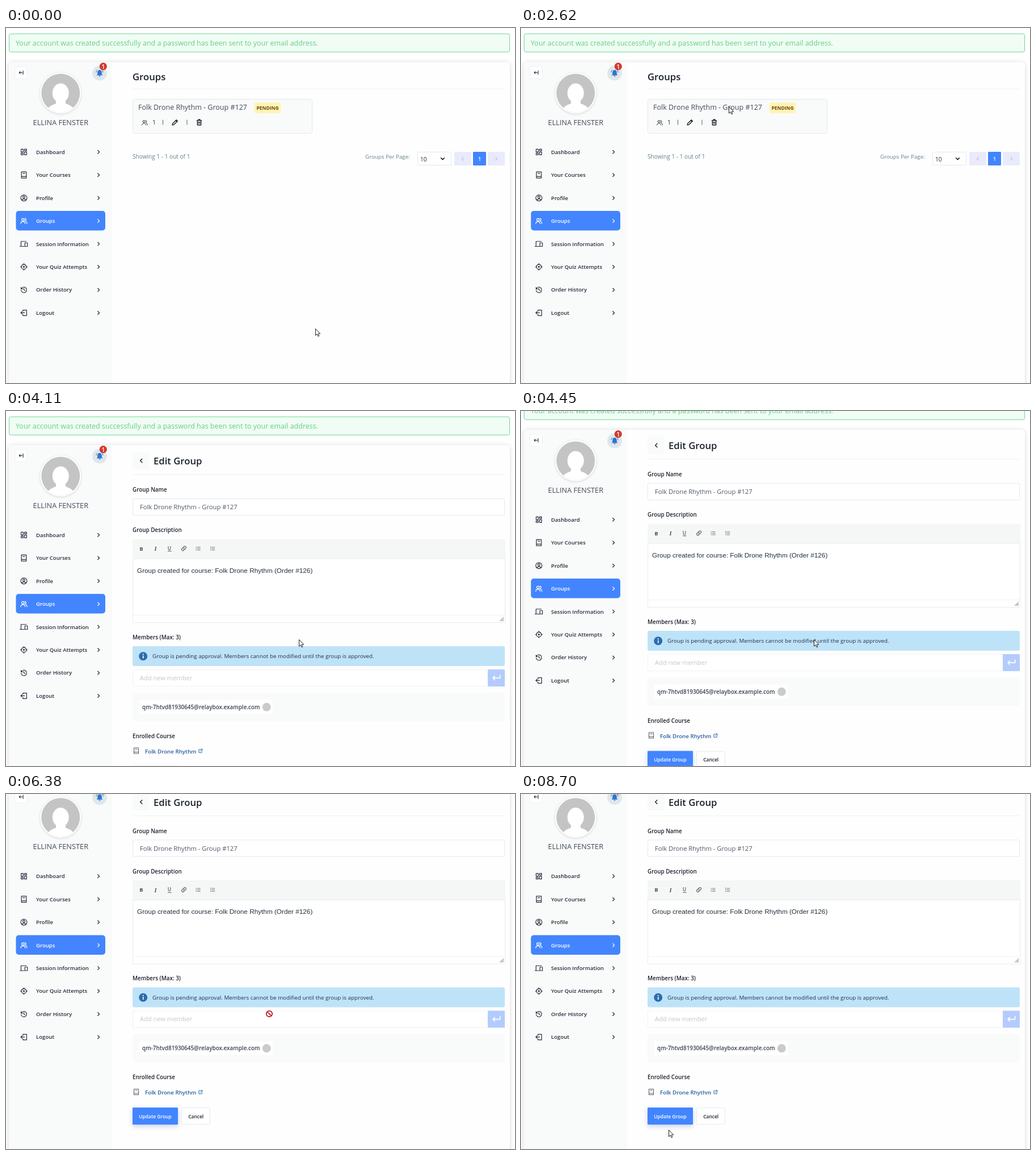
An HTML page with a canvas for the animation above (8830 ms loop, 897x625 px).

```html
<!DOCTYPE html>
<html lang="en">
<head>
<meta charset="utf-8">
<title>Group settings</title>
<style>
  html, body { margin: 0; width: 100%; height: 100%; overflow: hidden; background: #fff; }
  canvas { display: block; width: 897px; height: 625px; }
</style>
</head>
<body>
<canvas id="stage"></canvas>
<script>
const W = 897, H = 625, LOOP = 8830;
const PAGE_SWAP = 2680, CLICK = [2400, 2580];
const canvas = document.getElementById('stage');
const ctx = canvas.getContext('2d');
const dpr = window.devicePixelRatio || 1;
canvas.width = W * dpr;
canvas.height = H * dpr;

const SANS = '"Open Sans", "Noto Sans", sans-serif';
const ARIAL = '"Liberation Sans", Arial, sans-serif';
const BLUE = '#4285ff', INK = '#252e3c', DARK = '#1a202c', MUTED = '#64808a', LINE = '#e4e9ef';
const COURSE = 'Folk Drone Rhythm';
const GROUP = COURSE + ' - Group #127';

// Icon outlines on a 24 unit grid
const ICONS = {
  dashboard: 'M3 3h7v9H3zM14 3h7v5h-7zM14 12h7v9h-7zM3 16h7v5H3z',
  book: 'M4 2h16v20H4zM4 17h16M9 7h6',
  profile: 'M2 12a10 10 0 1 0 20 0a10 10 0 1 0-20 0M8.5 9.5a3.5 3.5 0 1 0 7 0a3.5 3.5 0 1 0-7 0M6 19c1-5 11-5 12 0',
  users: 'M5 8a4 4 0 1 0 8 0a4 4 0 1 0-8 0M2 21c0-9 14-9 14 0M15 4a4 4 0 0 1 0 8M18 14c3 1 4 4 4 7',
  devices: 'M4 18V5h15M1 19h12M15 9h7v10h-7z',
  target: 'M4 12a8 8 0 1 0 16 0a8 8 0 1 0-16 0M12 1v4M12 19v4M1 12h4M19 12h4M10 12a2 2 0 1 0 4 0a2 2 0 1 0-4 0',
  history: 'M4 8a9 9 0 1 1-1 5M3 4v5h5M12 7v5l4 2',
  logout: 'M9 7V3h12v18H9v-4M14 12H2M6 8l-4 4 4 4',
  pencil: 'M3 21l1-5L16 4l4 4L8 20zM14 6l4 4',
  trash: 'M4 6h16M9 6V3h6v3M6 6v15h12V6M10 11v5M14 11v5',
  link: 'M10 14a5 5 0 0 0 7 0l3-3a5 5 0 0 0-7-7l-1.5 1.5M14 10a5 5 0 0 0-7 0l-3 3a5 5 0 0 0 7 7l1.5-1.5',
  bullets: 'M9 5h13M9 12h13M9 19h13M2 5h3M2 12h3M2 19h3',
  numbers: 'M9 5h13M9 12h13M9 19h13M3.5 2v5M2 12h3M2 19h3',
  external: 'M11 5H4v15h15v-7M14 3h7v7M21 3L11 13',
  enter: 'M22 5v8H3M8 8l-5 5 5 5',
  right: 'M9 5l7 7-7 7',
  left: 'M15 5l-7 7 7 7',
  down: 'M5 9l7 7 7-7',
  collapse: 'M20 5v14M17 12H5M9 8l-4 4 4 4',
  bell: 'M12 2c-5 0-7 4-7 8v5l-3 4h20l-3-4v-5c0-4-2-8-7-8zM9 20a3 3 0 0 0 6 0z',
  ring: 'M1 9c0-3 1-5 3-7M23 9c0-3-1-5-3-7'
};

const MENU = [
  ['dashboard', 'Dashboard'], ['book', 'Your Courses'], ['profile', 'Profile'],
  ['users', 'Groups'], ['devices', 'Session Information'],
  ['target', 'Your Quiz Attempts'], ['history', 'Order History'], ['logout', 'Logout']
];

// Pointer stops: time, x, y
const PATH = [
  [70, 545, 529], [400, 178, 400], [600, 240, 262], [770, 335, 192], [940, 484, 174],
  [1010, 484, 170], [1400, 366, 140], [1840, 480, 146], [1910, 458, 144], [2100, 458, 144],
  [2250, 366, 138], [3020, 366, 138], [3400, 215, 190], [3750, 483, 333], [3970, 470, 372],
  [4110, 516, 402], [4700, 516, 402], [4950, 343.5, 369], [5010, 343.5, 369], [5290, 395, 364],
  [5700, 618, 364], [6170, 440, 364], [6380, 464, 387], [6440, 464, 387], [6650, 560, 480],
  [6900, 326, 545], [7060, 390, 580], [7400, 668, 602], [7700, 292, 568], [7950, 580, 604],
  [8060, 598, 608], [8400, 380, 608], [8700, 260, 591]
];

// Scroll offsets held from each time on
const SCROLL = [[4380, 9], [4450, 27], [4520, 48], [4590, 64], [4650, 71], [4720, 73.5]];

function scrollAt(t) {
  let y = 0;
  for (const [at, offset] of SCROLL) if (t >= at) y = offset;
  return y;
}

function pointerAt(t) {
  const i = PATH.findIndex(p => p[0] > t);
  if (i === 0) return PATH[0].slice(1);
  if (i < 0) return PATH[PATH.length - 1].slice(1);
  const [t0, x0, y0] = PATH[i - 1], [t1, x1, y1] = PATH[i];
  const k = (t - t0) / (t1 - t0);
  return [x0 + (x1 - x0) * k, y0 + (y1 - y0) * k];
}

// cy is the middle of the capitals
function text(str, x, cy, size, color, weight = 400, align = 'left', family = SANS) {
  ctx.font = `${weight} ${size}px ${family}`;
  ctx.textAlign = align;
  ctx.fillStyle = color;
  ctx.fillText(str, x, cy + size * 0.357);
}

function label(str, cy) {
  text(str, 223, cy, 9.85, DARK, 600);
}

function box(x, y, w, h, fill, r = 0, border) {
  ctx.beginPath();
  if (border) ctx.roundRect(x + 0.5, y + 0.5, w - 1, h - 1, r);
  else ctx.roundRect(x, y, w, h, r);
  if (fill) { ctx.fillStyle = fill; ctx.fill(); }
  if (border) { ctx.strokeStyle = border; ctx.lineWidth = 1; ctx.stroke(); }
}

function disc(x, y, r, fill) {
  ctx.beginPath();
  ctx.arc(x, y, r, 0, Math.PI * 2);
  ctx.fillStyle = fill;
  ctx.fill();
}

function icon(name, cx, cy, size, color, weight = 1.2, filled = false) {
  const k = size / 24, path = new Path2D(ICONS[name]);
  ctx.save();
  ctx.translate(cx - size / 2, cy - size / 2);
  ctx.scale(k, k);
  if (filled) {
    ctx.fillStyle = color;
    ctx.fill(path);
  } else {
    ctx.strokeStyle = color;
    ctx.lineWidth = weight / k;
    ctx.lineCap = ctx.lineJoin = 'round';
    ctx.stroke(path);
  }
  ctx.restore();
}

function withShadow(color, blur, dy, draw) {
  ctx.save();
  ctx.shadowColor = color;
  ctx.shadowBlur = blur * dpr;
  ctx.shadowOffsetY = dy * dpr;
  draw();
  ctx.restore();
}

function drawAvatar() {
  withShadow('rgba(0,0,0,.15)', 4, 1, () => disc(96.3, 114.5, 36, '#fff'));
  ctx.save();
  ctx.beginPath();
  ctx.arc(96.3, 114.5, 34, 0, Math.PI * 2);
  ctx.clip();
  ctx.fillStyle = '#c4c4c4';
  ctx.fillRect(60, 78, 74, 74);
  ctx.fillStyle = '#fff';
  ctx.beginPath();
  ctx.ellipse(96.3, 114.5, 14.5, 17, 0, 0, Math.PI * 2);
  ctx.fill();
  ctx.fill(new Path2D('M72 150C73 138 80 136 88 133L88 126H105V133C113 136 120 138 121 150Z'));
  ctx.restore();
}

function drawSidebar() {
  box(5, 60, 182, 740, '#f9fbfb', 6);
  box(15, 67, 23, 23, '#fff', 4, '#eceff2');
  icon('collapse', 26.5, 78.5, 11, INK, 1.1);
  drawAvatar();
  disc(165, 79.5, 13, '#dfe7ec');
  icon('bell', 165, 79.5, 13, '#2f74d0', 1, true);
  icon('ring', 165, 79.5, 13, '#2f74d0', 1);
  disc(171.3, 67.7, 6.6, '#d5392e');
  text('1', 171.3, 67.7, 10.8, '#fff', 600, 'center');
  text('ELLINA FENSTER', 96.3, 166, 12.8, '#434a58', 500, 'center');
  MENU.forEach(([name, title], i) => {
    const y = 218.3 + i * 40.45, active = title === 'Groups';
    const color = active ? '#fff' : INK;
    if (active) box(17.5, 322, 157.5, 34.5, BLUE, 5);
    icon(name, 31.5, y, name === 'devices' ? 15 : 13, color);
    text(title, 53, y, 9.6, color, 600);
    icon('right', 163, y, 9.5, color, 1.3);
  });
}

function drawGroupList() {
  text('Groups', 223, 86.5, 16.7, DARK, 600);
  box(223, 107, 656, 1, '#eef1f3');
  box(223, 125, 317, 61, '#f9fafa', 3, '#e4e8eb');
  text(GROUP, 233, 139.7, 12.5, '#414959', 500);
  box(438, 131, 46, 19, '#fef5b4', 3);
  text('PENDING', 461, 140.8, 8.5, '#744210', 700, 'center');
  icon('users', 244.5, 166.5, 11.5, INK, 1);
  text('1', 258, 166.5, 10.5, INK);
  icon('pencil', 298, 166, 13, DARK, 1.4);
  icon('trash', 340.5, 166, 12.5, DARK, 1.4);
  box(276, 161.5, 1, 9, '#596273');
  box(318.5, 161.5, 1, 9, '#596273');
  text('Showing 1 - 1 out of 1', 223, 226.7, 10.1, MUTED);
  text('Groups Per Page:', 633, 226.7, 9.8, MUTED);
  box(725, 218, 60, 24, '#fff', 1, LINE);
  text('10', 730, 231, 10.2, INK);
  icon('down', 769.5, 230, 10, DARK, 1.6);
  box(790, 218, 30, 24, '#e9ebfd', 1);
  box(823, 218, 23, 24, BLUE, 1);
  box(849, 218, 30, 24, '#e9ebfd', 1);
  icon('left', 805, 230.3, 9, '#b7bdd4', 1.1);
  text('1', 834.5, 230.5, 9.2, '#fff', 600, 'center');
  icon('right', 864, 230.3, 9, '#b7bdd4', 1.1);
}

function drawEditor() {
  box(223, 226, 657, 147, '#fff', 0, '#e8ebed');
  box(223, 226, 657, 34, '#f5f7f7');
  box(223, 259.5, 657, 1, '#e8ebed');
  box(223, 359, 657, 1, '#eff1f3');
  const tool = '#4a5160', faint = '#747b88';
  text('B', 238.5, 242.3, 9.5, tool, 700, 'center');
  text('I', 263.5, 242.3, 10.5, tool, 'italic 600', 'center', '"Liberation Serif", serif');
  text('U', 288, 241.8, 8.6, tool, 600, 'center');
  box(285, 246.3, 6.5, 1, tool);
  icon('link', 313.5, 242, 10.5, tool, 1.1);
  icon('bullets', 338.5, 242.3, 9, faint, 1);
  icon('numbers', 364, 242.3, 9, faint, 1);
  text(`Group created for course: ${COURSE} (Order #126)`, 231, 280.5, 11.78, '#222f3e', 400, 'left', ARIAL);
  ctx.fillStyle = '#c3c7cb';
  ctx.fill(new Path2D('M877 362V370H869Z'));
}

function drawMembers() {
  label('Members (Max: 3)', 398);
  box(223, 414, 656, 35, '#bee3f8', 3);
  disc(241.7, 431.7, 7.5, '#2b6cb0');
  box(240.9, 430.6, 1.7, 5, '#fff');
  disc(241.7, 428.3, 1.1, '#fff');
  text('Group is pending approval. Members cannot be modified until the group is approved.', 258, 431.8, 9.84, '#22324a');
  box(223, 455, 627, 30, '#fff', 1, '#f0f2f5');
  text('Add new member', 236, 470, 11.1, '#c3c7cc');
  box(849, 455, 30, 30, '#b3ccfd', 1);
  icon('enter', 864, 469.5, 16, '#fff', 1.6);
  box(223, 496, 656, 50, '#f9fafa', 3);
  box(235, 508.5, 235, 25, '#fff', 3);
  text('qm-7htvd81930645@relaybox.example.com', 240, 521, 9.88, '#39404e', 600);
  disc(459.3, 521.2, 7.4, '#cacaca');
}

function drawEditPage() {
  box(223, 72, 30, 31, '#f9fafa', 3);
  icon('left', 238.5, 87.5, 11, DARK, 1.4);
  text('Edit Group', 260, 88.5, 16.7, DARK, 600);
  box(223, 111.5, 656, 1, '#eef1f3');
  label('Group Name', 138.5);
  box(223, 154, 656, 30, '#fff', 1, LINE);
  text(GROUP, 236, 169.5, 11.18, '#4f5766');
  label('Group Description', 209.7);
  drawEditor();
  drawMembers();
  label('Enrolled Course', 572);
  icon('book', 229.5, 598, 12, '#5b6270', 1.1);
  text(COURSE, 245, 599.3, 9.75, '#24609c', 600);
  icon('external', 342.7, 598.5, 8.5, '#2f6fad', 1);
  withShadow('rgba(60,90,160,.28)', 8, 3, () => box(223, 625.5, 80, 30, BLUE, 1));
  text('Update Group', 263, 641, 8.45, '#fff', 600, 'center');
  box(309, 625.5, 51, 30, '#fff', 2, LINE);
  text('Cancel', 334.7, 641, 8.45, DARK, 600, 'center');
}

function drawPage(editing, scroll) {
  ctx.save();
  ctx.translate(0, -scroll);
  box(5, 9.7, 883, 33, '#f0fcf4', 3, '#72d596');
  text('Your account was created successfully and a password has been sent to your email address.', 17, 26.3, 12.48, '#62d084');
  withShadow('rgba(0,0,0,.16)', 8, 1, () => box(5, 60, 883, 740, '#fefefe', 6));
  drawSidebar();
  if (editing) drawEditPage(); else drawGroupList();
  ctx.restore();
}

function inside(x, y, x0, y0, x1, y1) {
  return x >= x0 && x <= x1 && y >= y0 && y <= y1;
}

function pointerKind(x, y, editing, scroll) {
  if (!editing) return 'arrow';
  const py = y + scroll;
  if (inside(x, py, 223, 455, 879, 485)) return 'blocked';
  if (inside(x, py, 223, 154, 879, 184) || inside(x, py, 223, 260, 879, 359)) return 'beam';
  if (inside(x, py, 223, 626, 303, 655) || inside(x, py, 309, 626, 360, 655)) return 'hand';
  return 'arrow';
}

const SHAPES = {
  arrow: new Path2D('M.5 .5V12.3L3.2 9.7L5.1 13.9L6.9 13.1L5.1 9.1H8.7Z'),
  hand: new Path2D('M-1.5 1C-1.5 -.5 1 -.5 1 1V5.5L6 6.5Q7.5 7 7.3 9L6 14H-1.5L-5 9Q-5 7.5 -3.5 7.5L-1.5 9Z'),
  beam: new Path2D('M-2.5 -6.5H2.5M0 -6.5V6.5M-2.5 6.5H2.5')
};

function drawPointer(x, y, kind) {
  ctx.save();
  ctx.translate(x, y);
  ctx.lineWidth = 1;
  ctx.strokeStyle = '#222';
  ctx.fillStyle = '#fff';
  if (kind === 'blocked') {
    ctx.beginPath();
    ctx.arc(0, 0, 5.2, 0, Math.PI * 2);
    ctx.fill();
    ctx.moveTo(-3.6, -3.6);
    ctx.lineTo(3.6, 3.6);
    ctx.strokeStyle = '#c4161c';
    ctx.lineWidth = 1.8;
    ctx.stroke();
  } else {
    if (kind !== 'beam') ctx.fill(SHAPES[kind]);
    ctx.stroke(SHAPES[kind]);
  }
  ctx.restore();
}

function render(t) {
  const editing = t >= PAGE_SWAP, scroll = scrollAt(t);
  const [x, y] = pointerAt(t);
  ctx.setTransform(dpr, 0, 0, dpr, 0, 0);
  ctx.fillStyle = '#fff';
  ctx.fillRect(0, 0, W, H);
  drawPage(editing, scroll);
  if (t >= CLICK[0] && t < CLICK[1]) disc(x, y, 11, 'rgba(255,255,0,.45)');
  drawPointer(x, y, pointerKind(x, y, editing, scroll));
}

let start = null;
function tick(now) {
  if (start === null) start = now;
  render((now - start) % LOOP);
  requestAnimationFrame(tick);
}
render(0);
requestAnimationFrame(tick);
</script>
</body>
</html>
```
